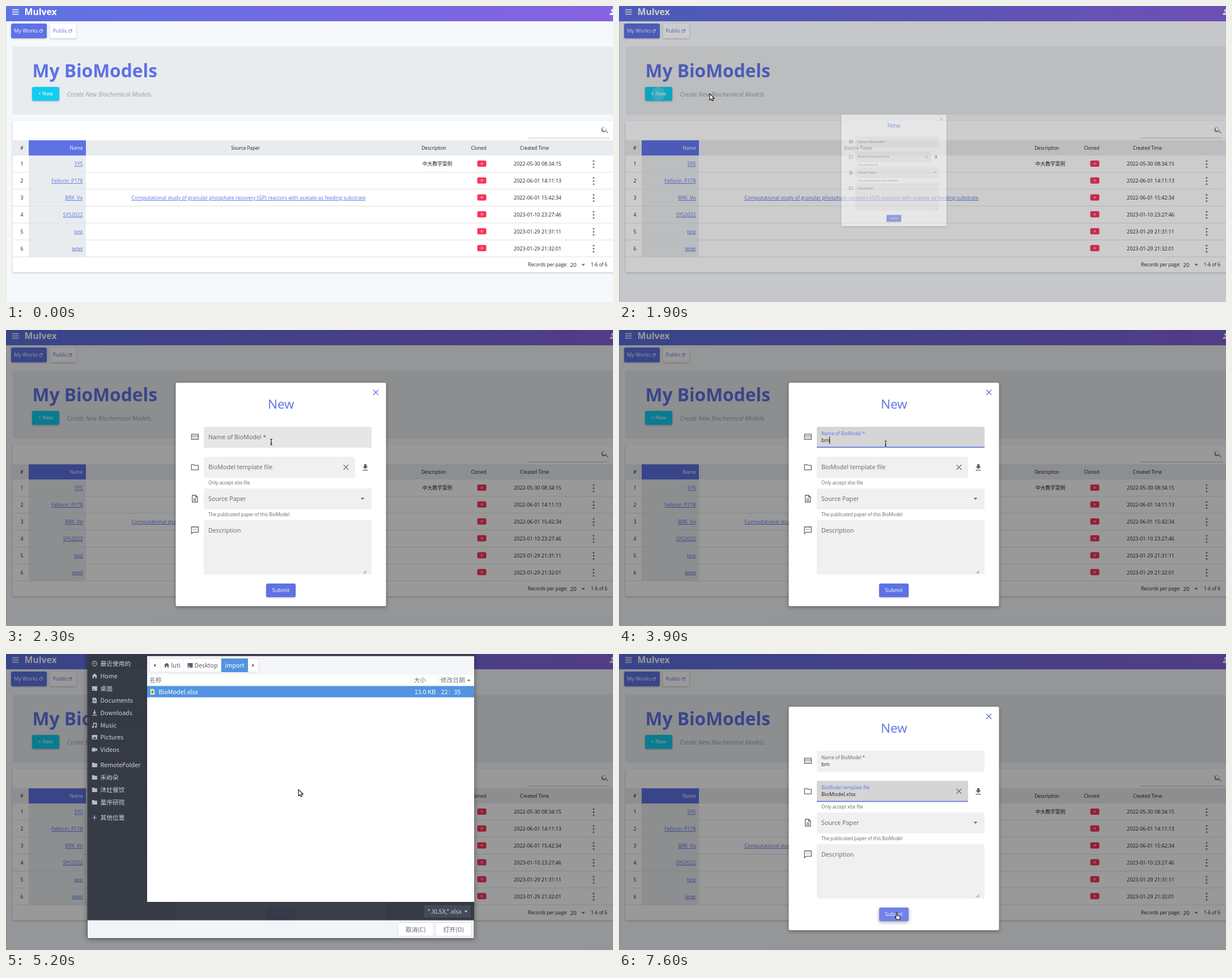
Write an HTML page that moves like this. It is 1071x523 px and loops after 8000 ms.

```html
<!DOCTYPE html>
<html lang="en">
<head>
<meta charset="utf-8">
<title>New model form</title>
<style>
  html, body { margin: 0; width: 100%; height: 100%; overflow: hidden; background: #f6f9fc; }
  svg { display: block; width: 1071px; height: 523px; font-family: "Open Sans", "Noto Sans CJK SC", "Noto Sans CJK", sans-serif; }
  text { white-space: pre; }
  .link { fill: #5e72e4; text-decoration: underline; }
  .raised { filter: drop-shadow(0 1px 1.5px rgba(0,0,0,.25)); }
  .lifted { filter: drop-shadow(0 2px 3px rgba(0,0,0,.35)); }
  .window { filter: drop-shadow(0 1px 5px rgba(0,0,0,.45)); }
  .gtk { font-family: "Noto Sans CJK SC", "Noto Sans CJK", "Noto Sans", sans-serif; }
</style>
</head>
<body>
<svg viewBox="0 0 1071 523">
  <defs>
    <linearGradient id="bar"><stop stop-color="#5e72e4"/><stop offset="1" stop-color="#8763e0"/></linearGradient>
    <clipPath id="newClip"><rect x="46" y="143" width="48" height="24.5" rx="2.5"/></clipPath>
  </defs>
  <g id="page"></g>
  <g id="newButton"></g>
  <rect id="shade" width="1071" height="523"/>
  <g id="modal"></g>
  <g id="chooser"></g>
  <g id="cursor"></g>
</svg>
<script>
const PRIMARY = '#5e72e4', INK = '#212121', GREY = '#666', BLUE = '#5294e2';
const LOOP = 8000, STEP = 100;
const $ = id => document.getElementById(id);

const text = (x, y, s, size, fill = INK, attrs = '') =>
  `<text x="${x}" y="${y}" font-size="${size}" fill="${fill}" ${attrs}>${s}</text>`;
const mid = (x, y, s, size, fill, attrs = '') => text(x, y, s, size, fill, `text-anchor="middle" ${attrs}`);
const end = (x, y, s, size, fill, attrs = '') => text(x, y, s, size, fill, `text-anchor="end" ${attrs}`);
const box = (x, y, w, h, fill, attrs = '') =>
  `<rect x="${x}" y="${y}" width="${w}" height="${h}" fill="${fill}" ${attrs}/>`;
const line = (d, color, width = 1) =>
  `<path d="${d}" fill="none" stroke="${color}" stroke-width="${width}"/>`;
const shape = (d, fill, x = 0, y = 0, scale = 1, attrs = '') =>
  `<path d="${d}" fill="${fill}" transform="translate(${x} ${y}) scale(${scale})" ${attrs}/>`;
const cross = (x, y, r, color, width) =>
  line(`M${x - r} ${y - r}l${2 * r} ${2 * r}m0 ${-2 * r}l${-2 * r} ${2 * r}`, color, width);
const caretDown = (x, y, fill, w = 6.7) => shape('M-.5 -.25h1l-.5 .5z', fill, x, y, w);

const refresh = (x, y, color) =>
  line(`M${x + 2} ${y - 1.6}a2.6 2.6 0 1 0 .5 2.4`, color, 1) + shape('M0 0v-3.2l-3.2 3.2z', color, x + 3, y);

const rows = [
  ['SYS', '2022-05-30 08:34:15'],
  ['Fellorin_P178', '2022-06-01 14:11:13'],
  ['BRK_Vo', '2022-06-01 15:42:34'],
  ['SYS2022', '2023-01-10 23:27:46'],
  ['test', '2023-01-29 21:31:11'],
  ['tetet', '2023-01-29 21:32:01'],
];
const PAPER = 'Computational study of granular phosphate recovery (GP) reactors with acetate as feeding substrate';

function tableRow([name, created], i) {
  const y = 279 + i * 29.85, base = y + 3.3;
  const dots = [-5.5, 0, 5.5].map(d => `<circle cx="1036.8" cy="${y + .5 + d}" r="1.5" fill="#757575"/>`).join('');
  return box(40, y - 14.5, 101, 29.3, '#e9ecef')
    + box(11.5, y + 14.5, 1060, .8, '#d9dadb')
    + mid(28, base, i + 1, 8.9)
    + end(135.5, base, name, 8.9, PRIMARY, 'class="link"')
    + box(831.5, y - 6, 16, 11, '#f5365c', 'rx="2.5"') + cross(839.5, y - .5, 1.8, '#fff', .9)
    + mid(938, base, created, 8.9) + dots;
}

function page() {
  return box(0, 0, 1071, 523, '#f6f9fc')
    + box(0, 27, 1, 496, '#e0e3e7')
    + box(0, 0, 1071, 27, 'url(#bar)')
    + line('M11 6.5h11.5m-11.5 4h11.5m-11.5 4h11.5', '#fff', 1.4)
    + text(32.5, 16, 'Mulvex', 15.8, '#fff', 'font-weight="700"')
    + shape('M12 4a4 4 0 1 0 .01 0zM4 20v-2c0-2.7 5.3-4 8-4s8 1.3 8 4v2z', '#fff', 1062.5, 2.5, .667)
    + box(9, 31, 63, 26, PRIMARY, 'rx="2.5" class="raised"')
    + text(14, 47.4, 'My Works', 9.2, '#fff') + refresh(61.5, 44, '#fff')
    + box(77.5, 31, 46.5, 26, '#fff', 'rx="2.5" class="raised"')
    + text(82.5, 47.4, 'Public', 9.3, PRIMARY) + refresh(113.5, 44, PRIMARY)
    + box(11.5, 71.5, 1070, 120.5, '#e9ecef', 'rx="3"')
    + text(46.5, 126.4, 'My BioModels', 31.7, PRIMARY, 'font-weight="700"')
    + text(107.5, 160, 'Create New Biochemical Models.', 10.6, '#999b9d', 'font-style="italic"')
    + box(11.5, 203, 1070, 267.5, '#fff', 'rx="3" class="raised"')
    + box(920, 232.8, 145, .8, '#b5b5b5')
    + shape('M15.5 14h-.8l-.3-.3A6.5 6.5 0 1 0 14 14.4l.3.3v.8l5 5L20.5 19zM9.5 14a4.5 4.5 0 1 1 0-9a4.5 4.5 0 0 1 0 9z',
        '#757575', 1049, 211.3, .667, 'fill-rule="evenodd"')
    + box(11.5, 237.3, 1060, 27, '#e9ecef') + box(40, 237.3, 101, 27, PRIMARY)
    + mid(28, 254, '#', 8.2) + end(135.5, 254, 'Name', 8.2, '#fff')
    + mid(422.5, 254, 'Source Paper', 8.2) + mid(755, 254, 'Description', 8.2)
    + mid(834, 254, 'Cloned', 8.2) + mid(932.5, 254, 'Created Time', 8.2)
    + rows.map(tableRow).join('')
    + mid(761, 282.4, '中大教学案例', 8.75)
    + mid(428, 342, PAPER, 8.9, PRIMARY, 'class="link"')
    + text(921, 460.2, 'Records per page:', 8.3) + text(995.5, 460.6, '20', 9.5)
    + caretDown(1018.5, 457.5, '#757575') + text(1032, 460.2, '1-6 of 6', 8.3);
}

function newButton(t) {
  const hover = t >= 1800 && t < 1900;
  const age = (t - 1800) / 100;
  const ripple = age > 0 && age < 5
    ? `<circle cx="69" cy="155" r="${6 + 6 * age}" fill="#fff" opacity="${.25 - .05 * age}" clip-path="url(#newClip)"/>` : '';
  return box(46, 143, 48, 24.5, hover ? '#3cd2f1' : '#11cdef', `rx="2.5" class="${hover ? 'lifted' : 'raised'}"`)
    + ripple + mid(70, 158, '+ New', 9.1, '#fff');
}

function field(y, w, h, label, { state = 'idle', value = '' } = {}) {
  const fill = { idle: '#f0f0f0', hover: '#e6e6e6', focus: '#d5d5d5' }[state];
  const focused = state === 'focus';
  const color = focused ? PRIMARY : GREY;
  return box(349, y, w, h, fill, 'rx="2.5"')
    + (focused ? box(349, y + h - 1.6, w, 1.6, PRIMARY) : '')
    + (value
      ? text(357, y + 14.6, label, 8.1, color) + text(357, y + 27.4, value, 9.4)
      : text(357, y + 22.2, label, 10.75, color));
}

const icon = (y, d) =>
  `<path d="${d}" transform="translate(325.3 ${y - 8}) scale(.667)" fill="none" stroke="#6b625c" stroke-width="1.9"/>`;

function modal(t) {
  const typed = t >= 3900, loaded = t >= 7000, hot = t >= 7600;
  const name = { value: typed ? 'bm' : '', state: t >= 4800 ? 'idle' : typed ? 'focus' : t >= 2200 ? 'hover' : 'idle' };
  const file = { value: loaded ? 'BioModel.xlsx' : '', state: t >= 4800 ? 'focus' : t >= 4500 ? 'hover' : 'idle' };
  return box(299.5, 93.3, 371, 394.7, '#fff', 'rx="2.7" class="lifted"')
    + cross(652.5, 110.3, 4.5, PRIMARY, 1.3)
    + mid(485.3, 139, 'New', 22.4, PRIMARY)
    + icon(188.7, 'M3 5h18v14H3zM3 10h18M6 15h3m2 0h3m2 0h2')
    + field(171, 296, 37, 'Name of BioModel *', name)
    + (typed && t < 4500 ? box(371.2, 188.5, 1, 12.5, '#000') : '')
    + icon(242.5, 'M3 5h6.5l2 2H21v12H3z')
    + field(224, 267, 37.3, 'BioModel template file', file)
    + cross(599.8, 242.5, 4.4, GREY, 1.3)
    + shape('M19 9h-4V3H9v6H5l7 7zM5 18v2h14v-2z', '#616161', 626, 235, .667)
    + text(357, 273.3, 'Only accept xlsx file', 8.05, GREY)
    + icon(298, 'M5 3h9l5 5v13H5zM14 3v5h5M8 12.5h8M8 16.5h8')
    + field(280, 296, 37, 'Source Paper') + caretDown(629, 298.3, GREY)
    + text(357, 329.2, 'The publicated paper of this BioModel', 8.05, GREY)
    + icon(354, 'M3 3h18v14H7l-4 4zM7 10h2m2 0h2m2 0h2')
    + field(336, 296, 96, 'Description')
    + line('M630.5 430l5-5m-2 5l2-2', '#555', .9)
    + box(459, 448, 52, 24, hot ? '#7182e8' : PRIMARY, `rx="2.5" class="${hot ? 'lifted' : 'raised'}"`)
    + mid(485, 463.4, 'Submit', 9.35, '#fff');
}

const FOLDER = 'M-4.5 -4h3.5l1 1.3h4.5v6.7h-9z';
const places = [
  [17, '最近使用的', 'clock'],
  [39, 'Home', 'M-5 0l5-4.7 5 4.7h-1.4v4.2h-2.3v-3h-2.6v3h-2.3v-4.2z'],
  [61, '桌面', 'M-4.5 -4h9v8h-9zM-3 1v1.7h2v-1.7z'],
  [82, 'Documents', 'M-3.7 -4.8h5l2.4 2.4v7.2h-7.4zM-2 -1v1h4v-1zM-2 1.3v1h4v-1z'],
  [104, 'Downloads', 'M-1 -4.8h2v4h2.4l-3.4 3.2-3.4-3.2h2.4zM-4 3.3h8v1.4h-8z'],
  [126, 'Music', 'M-2.5 -4.5h6.5v7a1.7 1.7 0 1 1-1.3-1.6v-3.5h-3.9v5.5a1.7 1.7 0 1 1-1.3-1.6z'],
  [147, 'Pictures', 'M-4.7 -4h9.4v8h-9.4zM-3.5 2.7h7l-2.5-3.7-1.6 2-1-1z'],
  [169, 'Videos', 'M-4.8 -3.3h6.4v2.2l3-2v6.2l-3-2v2.2h-6.4z'],
  [196, 'RemoteFolder', FOLDER],
  [218, '禾屿朵', FOLDER],
  [240, '沐灶餐饮', FOLDER],
  [262, '量序研院', FOLDER],
  [289, '其他位置', 'M-.6 -3.7h1.2v3.1h3.1v1.2h-3.1v3.1h-1.2v-3.1h-3.1v-1.2h3.1z'],
];

function place([y, label, glyph]) {
  const mark = glyph === 'clock'
    ? `<circle cx="156.3" cy="${y}" r="4.1" fill="none" stroke="#b4bcc8" stroke-width="1.1"/>` + line(`M154.3 ${y - 2}l2 2h2`, '#b4bcc8')
    : shape(glyph, '#b4bcc8', 156.3, y, 1, 'fill-rule="evenodd"');
  return mark + text(166.5, y + 4, label, 10.75, '#ccd3dc');
}

function chooser(t) {
  const size = 10.75, soft = '#5c616c', edge = '#cfd6e0';
  const press = t >= 6300 ? 1 : t >= 6200 ? .5 : 0;
  const button = (x, label, fill, color) =>
    box(x, 474.5, 63.5, 24, fill, `rx="2" stroke="${edge}" stroke-width=".8"`) + mid(x + 31.8, 490.8, label, size, color);
  return `<g class="gtk"><g class="window">${box(143.5, -4, 682.5, 506.5, '#353945', 'fill-opacity=".95"')}</g>`
    + places.map(place).join('')
    + box(249, 3.7, 577, 33.3, '#f5f6f7') + box(249, 37, 577, 401, '#fff')
    + box(253, 8, 193.5, 24, '#fff', `rx="2" stroke="${edge}" stroke-width=".8"`)
    + line('M272.3 8v24M313.7 8v24', '#e3e7ee', .8)
    + box(379.7, 8, 47.3, 24, BLUE)
    + shape('M2 -3v6l-3.5-3z', soft, 262, 20)
    + shape('M-1.5 -3v6l3.5-3z', t >= 5800 ? '#b4b7bd' : soft, 436, 20)
    + shape(places[1][2], soft, 283.5, 20, .95) + text(291.3, 24, 'luti', size, soft)
    + shape(places[2][2], soft, 325, 20, 1, 'fill-rule="evenodd"') + text(332.5, 24, 'Desktop', size, soft)
    + mid(403.5, 24, 'import', size, '#fff')
    + text(253, 50, '名称', size, '#70757f') + text(719.5, 50, '大小', size, '#70757f') + text(766.8, 50, '修改日期', size, '#70757f')
    + line('M715.3 39v15M762.3 39v15', '#dcdfe3', .8) + shape('M-3 1.5h6l-3-3z', soft, 816.5, 46)
    + box(249, 56.5, 577, 20, BLUE)
    + shape('M-3.8 -5h5.2l2.4 2.4v7.6h-7.6z', '#f2efd8', 258.5, 66.7) + box(256.5, 64.5, 4, 5, '#7b9c55')
    + text(269.3, 70.6, 'BioModel.xlsx', size, '#fff')
    + end(758, 70.6, '13.0 KB', size, '#fff') + text(767.5, 70.6, '22：35', size, '#fff')
    + box(737, 443, 84, 23.5, '#444a58', 'rx="2" stroke="#2b2e39" stroke-width=".8"')
    + text(743.5, 458.7, '*.XLSX,*.xlsx', size, '#ccd3dc') + caretDown(811.5, 455, '#ccd3dc', 6)
    + box(144, 470.5, 681.5, 31.5, '#f2f5f8')
    + button(691, '取消(C)', '#fff', soft)
    + button(758, '打开(O)', press ? (press < 1 ? '#a8c9f0' : BLUE) : '#fff', press ? '#3c5c8c' : soft)
    + '</g>';
}

const pointers = {
  arrow: 'M0 0V11.4L2.7 9 4.4 12.6 6.4 11.7 4.8 8.1H8.4Z',
  hand: 'M-1 0Q0 -1.3 1 0V4.2L5 5Q6.3 5.4 6 7L5.2 11H0L-3 7Q-2.8 5.8 -1 7Z',
};
// time, x, y, pointer
const moves = [
  [1900, 160, 155, 'arrow'], [2000, 341, 147, 'arrow'], [2100, 430, 166, 'arrow'],
  [2200, 460, 189, 'beam'], [2300, 468, 198, 'beam'], [2400, 470.5, 201, 'beam'],
  [4500, 516, 240, 'hand'], [5200, 516, 239.5, 'arrow'], [5800, 361.5, 72, 'arrow'],
  [6000, 359.5, 69.5, 'arrow'], [6200, 359, 68.5, 'arrow'], [6600, 0, 0, 'none'],
  [7000, 455, 334, 'arrow'], [7600, 490, 458, 'hand'],
];

function cursorAt(t) {
  if (t < 1000) return [0, 0, 'none'];
  if (t < 1900) {
    const u = (t - 1000) / 800, k = 1 - (1 - u * u * (3 - 2 * u)) ** 1.3;
    return [1061 - 971 * k, 5 + 151 * k, 'arrow'];
  }
  return moves.filter(m => m[0] <= t).pop().slice(1);
}

function cursor(t) {
  const [x, y, kind] = cursorAt(t);
  if (kind === 'none') return '';
  if (kind === 'beam') {
    const d = `M${x - 2} ${y - 5}h1.2l.8 .8.8-.8h1.2M${x} ${y - 4}v8.5M${x - 2} ${y + 5}h1.2l.8-.8.8.8h1.2M${x - 1.5} ${y + 1.5}h3`;
    return line(d, '#fff', 2.4) + line(d, '#111', 1.2);
  }
  return shape(pointers[kind], '#fff', x, y, 1, 'stroke="#111" stroke-width="1.1" stroke-linejoin="round"');
}

const opening = { 1900: .5, 2000: .91, 2100: .99 };

function draw(t) {
  const p = t < 1900 ? 0 : opening[t] ?? 1;
  $('newButton').innerHTML = newButton(t);
  $('shade').setAttribute('fill-opacity', .4 * p);
  $('modal').innerHTML = p ? modal(t) : '';
  $('modal').setAttribute('opacity', p < 1 ? Math.min(1, p + .03) : 1);
  $('modal').setAttribute('transform', `translate(485 290.6) scale(${p}) translate(-485 -290.6)`);
  $('chooser').innerHTML = t >= 5200 && t < 6600 ? chooser(t) : '';
  $('cursor').innerHTML = cursor(t);
}

$('page').innerHTML = page();
const start = performance.now();
let shown = -1;
function tick() {
  const t = Math.floor((performance.now() - start) % LOOP / STEP) * STEP;
  if (t !== shown) draw(shown = t);
  requestAnimationFrame(tick);
}
tick();
</script>
</body>
</html>
```
